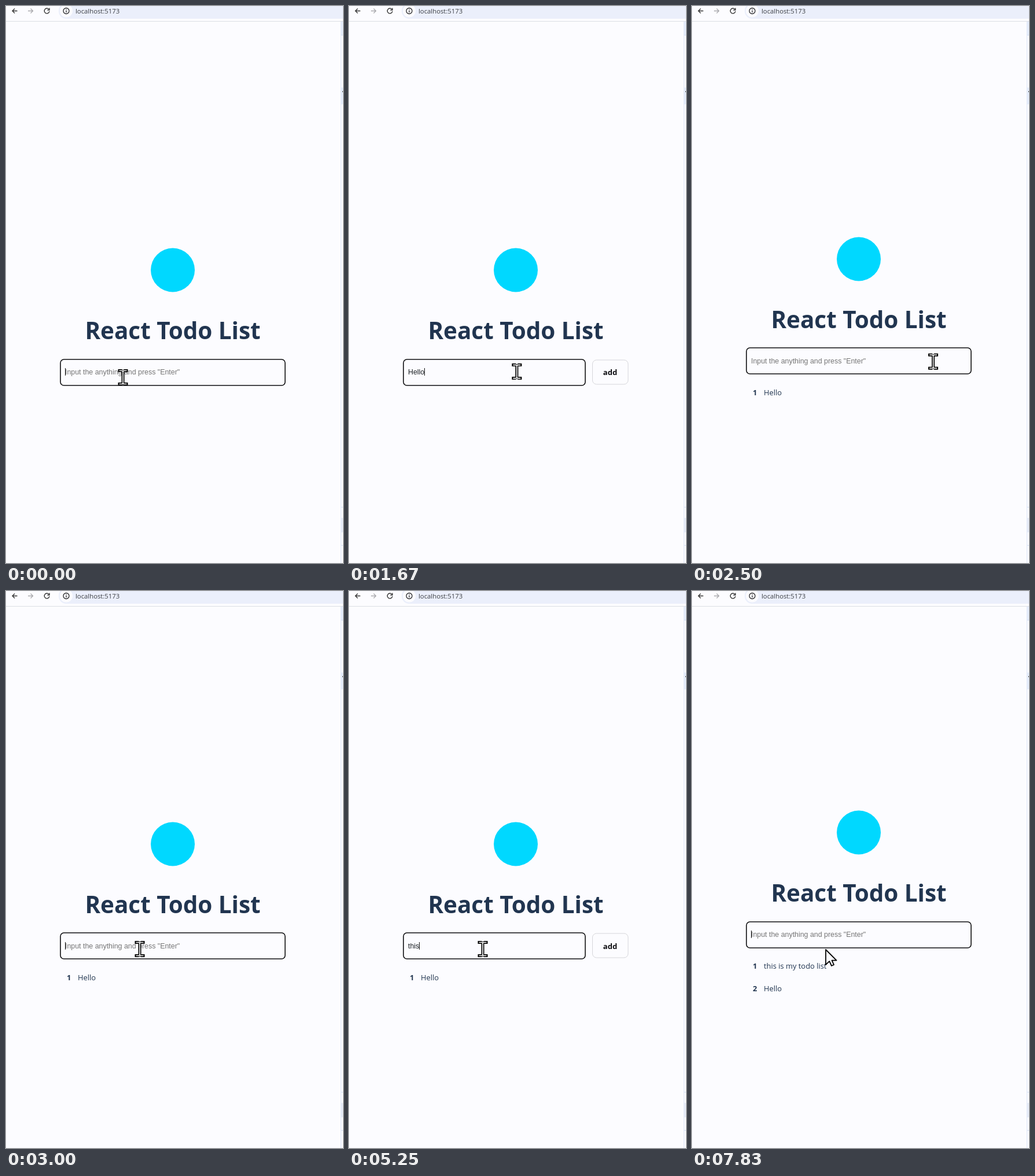
These frames come from a looping animation (582 by 963 pixels, 8 s). An HTML page with a canvas:

```html
<!DOCTYPE html>
<html lang="en">
<head>
<meta charset="utf-8">
<title>React Todo List</title>
<style>
html, body { margin: 0; width: 582px; height: 963px; overflow: hidden; background: #fcfcff; }
canvas { display: block; }
</style>
</head>
<body>
<canvas id="stage" width="582" height="963"></canvas>
<script>
const ctx = document.getElementById('stage').getContext('2d');
const LOOP = 8000, TICK = 1000 / 12, ROW = 39;
const UI = '"Open Sans", "Noto Sans", sans-serif';
const FIELD = '12.4px "Liberation Sans", Arial, sans-serif';
const CJK = '14px "Noto Sans CJK SC", "Noto Sans CJK", sans-serif';
const PAGE = '#fcfcff', INK = '#213550', BLUE = '#1f74dc', RED = '#f0392f';

// time, text in the field
const typing = [
  [0, ''], [250, 'H'], [580, 'He'], [830, 'Hel'], [1000, 'Hell'], [1170, 'Hello'], [2330, ''],
  [4250, 't'], [4580, 'th'], [4830, ''],
  [5000, 't'], [5080, 'th'], [5170, 'thi'], [5250, 'this'], [5420, 'this '],
  [5500, 'this i'], [5670, 'this is '], [6000, 'this is m'], [6170, 'this is my'],
  [6330, 'this is my '], [6910, 'this is my t'], [7000, 'this is my to'],
  [7080, 'this is my tod'], [7170, 'this is my todo'], [7330, 'this is my todo '],
  [7420, 'this is my todo li'], [7580, 'this is my todo list'], [7830, '']
];

const items = [
  [0, []], [2330, ['Hello']], [7830, ['this is my todo list', 'Hello']]
];

// time, composed letters, candidates
const composing = [
  [0], [580, 'e', '额 饿 恶 哦 饿了'], [830, 'el', '饿了 恶劣 饿啦 额 饿'],
  [1000, 'ell', 'Tilu 额 饿 恶 哦'], [1170, 'ello', '饿了哦 恶劣哦 饿咯 额 恶'], [1420]
];

const caretOff = [[2330, 3000], [3580, 4080], [6830, 6910]];

// start, end, from, to
const moves = [
  [1333, 2166, [202, 642], [451, 614]],
  [2333, 3000, [451, 614], [231, 619]]
];

const at = (list, t) => list.filter(e => e[0] <= t).pop();

function text(str, x, y, font, color) {
  ctx.font = font;
  ctx.fillStyle = color;
  ctx.fillText(str, x, y);
  return ctx.measureText(str).width;
}

function rect(x, y, w, h, color) {
  ctx.fillStyle = color;
  ctx.fillRect(x, y, w, h);
}

function disc(x, y, r, color) {
  ctx.fillStyle = color;
  ctx.beginPath();
  ctx.arc(x, y, r, 0, 7);
  ctx.fill();
}

function stroke(path, color, width) {
  ctx.strokeStyle = color;
  ctx.lineWidth = width;
  ctx.stroke(new Path2D(path));
}

function frame(x, y, w, h, r, color, width, fill) {
  ctx.beginPath();
  ctx.roundRect(x, y, w, h, r);
  if (fill) { ctx.fillStyle = fill; ctx.fill(); }
  ctx.strokeStyle = color;
  ctx.lineWidth = width;
  ctx.stroke();
}

function browser() {
  rect(0, 0, 582, 963, PAGE);
  ctx.fillStyle = '#ebeffb';
  ctx.beginPath();
  ctx.roundRect(91, -5, 520, 27, 13);
  ctx.fill();
  disc(104, 8.5, 11, PAGE);
  rect(0, 26, 582, 1, '#dcdee4');

  stroke('M19.5 8.5H11M15 4.5L11 8.5L15 12.5', '#333', 1.3);
  stroke('M38 8.5H46.5M42.5 4.5L46.5 8.5L42.5 12.5', '#a9a9ad', 1.3);
  stroke('M74 5.6A4.4 4.4 0 1 0 75 9.2M75 3.6V7H71.4', '#333', 1.4);
  stroke('M99 8.5a5 5 0 1 0 10 0a5 5 0 1 0 -10 0M104 7.8V11.2M104 5.6V6.8', '#2a2a2c', 1.3);
  text('localhost:5173', 120, 12.5, '11.3px ' + UI, '#3c3f45');

  rect(579, 27, 3, 23, '#e8effc');
  rect(579, 141, 3, 29, '#e8effc');
  rect(579, 885, 3, 25, '#e9edf8');
  rect(578, 27, 1, 936, '#dbe4f6');
  rect(579, 50, 3, 1, '#d8e2f5');
  rect(579, 866, 3, 1, '#d8e2f5');
  rect(579, 932, 3, 1, '#d8e2f5');
  rect(581, 147, 1, 2, '#444');
}

function page(t, value, list) {
  const shift = list.length * ROW / 2;
  // text snaps down to whole pixels, boxes snap up
  const boxTop = 611 - Math.ceil(shift) + Math.floor(shift);
  ctx.save();
  ctx.translate(0, -Math.floor(shift));
  disc(288, 456.5, 38, '#00d8ff');
  ctx.textAlign = 'center';
  text('React Todo List', 288, 576, '700 40.4px ' + UI, INK);
  ctx.textAlign = 'left';
  frame(94, boxTop, value ? 314 : 388, 45, 6, '#0e0e10', 1.6);
  if (value) {
    frame(420.5, boxTop + 1, 61.5, 42, 7, '#d6d6da', 1);
    ctx.textAlign = 'center';
    text('add', 451, 638, '700 13px ' + UI, '#0c0c10');
    ctx.textAlign = 'left';
  }
  text(value || 'Input the anything and press "Enter"', 102, 637, FIELD, value ? '#1d2226' : '#757575');
  ctx.font = FIELD;
  if (!caretOff.some(([a, b]) => t >= a && t < b))
    rect(102 + Math.floor(ctx.measureText(value).width), 626, 1, 13, '#111');
  list.forEach((item, i) => {
    const y = 692 + i * ROW;
    text(i + 1, 105, y, '700 12.9px ' + UI, INK);
    text(item, 124, y, '12.9px ' + UI, INK);
  });
  ctx.restore();
}

function popup([, letters, words]) {
  if (!letters) return;
  const list = words.split(' ');
  const latin = w => /^[a-z]/i.test(w);
  const fontOf = w => latin(w) ? '600 13px ' + UI : CJK;
  let end = 110;
  for (const w of list) {
    ctx.font = fontOf(w);
    end += ctx.measureText(w).width + 20;
  }
  const right = Math.round(end + 70);
  frame(111.5, 640.5, right - 112, 43, 1, '#a9bce2', 1, PAGE);

  const glow = ctx.createLinearGradient(right - 50, 0, right - 18, 0);
  glow.addColorStop(0, PAGE);
  glow.addColorStop(1, '#efeefd');
  rect(right - 50, 641, 40, 18, glow);
  disc(right - 12.5, 650, 7, '#f0703a');

  const w = text(letters, 121, 654, '12.4px ' + UI, BLUE);
  rect(Math.round(121 + w), 643, 1, 13, RED);
  let x = 121;
  list.forEach((word, i) => {
    const color = i ? BLUE : RED;
    ctx.globalAlpha = 0.75;
    text(i + 1, x, 675, '10.5px ' + UI, color);
    ctx.globalAlpha = 1;
    x += text(word, x + 9, latin(word) ? 675.5 : 676, fontOf(word), color) + 20;
  });
  const arrow = right - 23;
  stroke(`M${arrow - 9} 669l-2.5 3l2.5 3`, '#cfdcf2', 1);
  stroke(`M${arrow - 1.5} 668.5l3 3.5l-3 3.5`, BLUE, 1.2);
}

const shapes = {
  arrow: 'M0 1V27L6.3 21.2L10 29L14 27.2L10.6 19.6H18.5Z',
  hand: 'M-2.6 20V2.5C-2.6 -.6 2.2 -.6 2.2 2.5V11C2.6 9 6.4 9 6.4 11.5V12.5' +
    'C6.8 10.4 10.6 10.6 10.6 13V14C11 12 14.6 12.4 14.6 15V24' +
    'C14.6 29.5 11 33 5.5 33C0 33 -2.5 31 -5 27L-10 18.5C-11 15.6 -8 14.4 -6 16.4Z'
};

function pointer(kind, x, y) {
  ctx.save();
  ctx.translate(x, y);
  ctx.lineJoin = 'round';
  if (kind === 'beam') {
    stroke('M-8.5 -11.5H-1.5M1.5 -11.5H8.5M0 -13V13M-8.5 11.5H-1.5M1.5 11.5H8.5', '#000', 5);
    stroke('M-6.5 -11.5H-1L0 -10L1 -11.5H6.5M0 -10V10M-6.5 11.5H-1L0 10L1 11.5H6.5', '#fff', 1.6);
  } else {
    ctx.fillStyle = PAGE;
    ctx.fill(new Path2D(shapes[kind]));
    stroke(shapes[kind], '#000', 1.8);
    if (kind === 'hand') stroke('M2.2 10V16.5M6.4 12V17M10.6 13.5V17.5', '#000', 1.4);
  }
  ctx.restore();
}

function mouseAt(t) {
  const now = Math.floor((t + 5) / TICK) * TICK;
  let pos = moves[0][2];
  for (const [a, b, from, to] of moves) {
    const p = Math.min(1, Math.max(0, (now - a) / (b - a)));
    const e = p * p * (3 - 2 * p);
    if (p > 0) pos = from.map((v, i) => v + (to[i] - v) * e);
  }
  return pos;
}

function cursor(t, value, count) {
  const [x, y] = mouseAt(t);
  const top = 610 - count * ROW / 2;
  const inside = y >= top && y <= top + 46;
  const kind = !inside ? 'arrow'
    : x <= (value ? 408 : 482) ? 'beam'
    : value && x >= 420 && x <= 482 ? 'hand' : 'arrow';
  pointer(kind, x, y);
}

function draw(t) {
  const value = at(typing, t)[1], list = at(items, t)[1];
  browser();
  page(t, value, list);
  popup(at(composing, t));
  cursor(t, value, list.length);
}

const start = performance.now();
function loop() {
  draw((performance.now() - start) % LOOP);
  requestAnimationFrame(loop);
}
loop();
</script>
</body>
</html>
```
